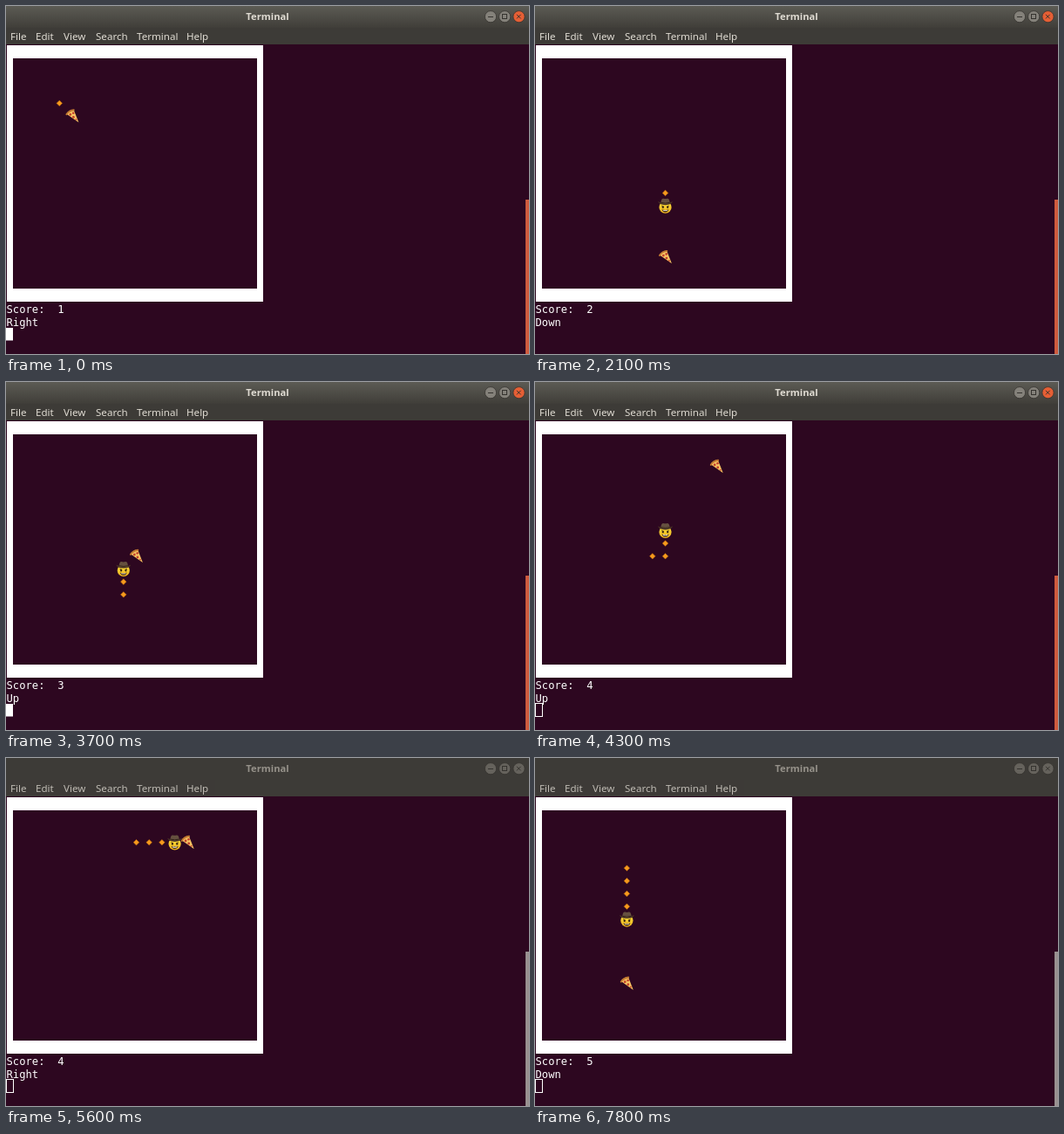
Write an HTML page that moves like this. It is 600 px wide and 399 px high and loops after 8 s.

```html
<!DOCTYPE html>
<html lang="en">
<head>
<meta charset="utf-8">
<title>Terminal</title>
<style>
  html, body { margin: 0; width: 100%; height: 100%; overflow: hidden; background: #2d0720; }
  svg { display: block; width: 600px; height: 399px; }
  .ui { font-family: "Noto Sans", "Open Sans", sans-serif; font-size: 11.6px; fill: #dfdbd2; }
  .title { font-size: 11.2px; font-weight: 700; text-anchor: middle; }
  .mono { font-family: "DejaVu Sans Mono", monospace; font-size: 12.2px; fill: #fff; white-space: pre; }
</style>
</head>
<body>
<svg viewBox="0 0 600 399">
  <defs>
    <linearGradient id="bar" x1="0" y1="0" x2="0" y2="1">
      <stop offset="0" stop-color="#5c5b54"/>
      <stop offset="1" stop-color="#403e39"/>
    </linearGradient>
    <linearGradient id="skin" x1="0" y1="0" x2="0" y2="1">
      <stop offset="0" stop-color="#fbe13c"/>
      <stop offset="1" stop-color="#eeb320"/>
    </linearGradient>
    <path id="dot" d="M0-3.3 3.3 0 0 3.3-3.3 0z" fill="#f59a1d" stroke="#b9640f" stroke-width=".5"/>
    <g id="pizza">
      <path d="M-6.6-2.4Q-4-7 1.6-7.4L7.4 7.4z" fill="#f6c463"/>
      <path d="M-6.6-1.9Q-4-6.4 1.8-7" fill="none" stroke="#c27a32" stroke-width="1.9" stroke-linecap="round"/>
      <g fill="#c2402c">
        <circle cx="-2.2" cy="-1.8" r="1.4"/>
        <circle cx="1.2" cy="-3.5" r="1.3"/>
        <circle cx="1.4" cy="1.2" r="1.4"/>
        <circle cx="4.4" cy="4" r=".9"/>
      </g>
    </g>
    <g id="face">
      <circle cy="1.6" r="7.1" fill="url(#skin)"/>
      <path d="M-8.4-5Q-5-2.6 0-2.6T8.4-5Q7.5-.9 0-.9T-8.4-5z" fill="#4a3426"/>
      <path d="M-5.2-3.2Q-4.8-8.6-2.2-8.4Q0-7.6 2.2-8.4Q4.8-8.6 5.2-3.2Q0-1.6-5.2-3.2z" fill="#65503f"/>
      <path d="M-5.1-3.7Q0-2.3 5.1-3.7" fill="none" stroke="#33231a"/>
      <path d="M-4.2 0-1.6 1.1M4.2 0 1.6 1.1" stroke="#493012" stroke-width=".9"/>
      <ellipse cx="-2.7" cy="1.7" rx="1.1" ry="1.3" fill="#3b2912"/>
      <ellipse cx="2.7" cy="1.7" rx="1.1" ry="1.3" fill="#3b2912"/>
      <path d="M-4 4.2Q0 5.4 4 4.2Q2.8 7.4 0 7.4T-4 4.2z" fill="#493012"/>
      <path d="M-2.8 4.8Q0 5.5 2.8 4.8L2.4 5.6Q0 6.1-2.4 5.6z" fill="#fff"/>
    </g>
    <g id="signs" fill="none" stroke="#35332f">
      <path d="M553 12.5h6"/>
      <rect x="569.5" y="9.5" width="5" height="5"/>
      <path d="M586 9.8l4.6 4.6m0-4.6l-4.6 4.6"/>
    </g>
  </defs>

  <rect width="600" height="399" fill="#2d0720"/>
  <rect width="600" height="44" fill="#3d3b37"/>
  <rect width="600" height="25" fill="url(#bar)"/>
  <g stroke="#35332f" stroke-width=".8">
    <circle cx="556" cy="12.2" r="6.6" fill="#84817a"/>
    <circle cx="572.2" cy="12.2" r="6.6" fill="#84817a"/>
    <circle cx="588.5" cy="12.2" r="6.6" fill="#e65f35"/>
  </g>
  <use href="#signs"/>
  <text class="ui title" x="300" y="16.3">Terminal</text>
  <g class="ui" id="menu"></g>
  <rect x="596" y="222" width="4" height="177" fill="#cf5b3e"/>

  <g id="dim" opacity="0">
    <rect width="600" height="25" fill="#3d3b37"/>
    <g fill="#65625c" stroke="#35332f" stroke-width=".8">
      <circle cx="556" cy="12.2" r="6.6"/>
      <circle cx="572.2" cy="12.2" r="6.6"/>
      <circle cx="588.5" cy="12.2" r="6.6"/>
    </g>
    <use href="#signs"/>
    <text class="ui title" x="300" y="16.3" style="fill:#96928a">Terminal</text>
    <rect y="25" width="240" height="19" fill="#3d3b37" opacity=".2"/>
    <rect x="596" y="222" width="4" height="177" fill="#989090"/>
  </g>

  <path d="M1 45H295V339H1zM8 60V324H288V60z" fill="#fff" fill-rule="evenodd"/>
  <g id="board"></g>
  <text class="mono" id="score" x="0.5" y="352"></text>
  <text class="mono" id="label" x="0.5" y="366.7"></text>
  <rect id="block" y="369" width="8" height="14.5" fill="#fff"/>
  <rect id="hollow" x=".5" y="368.5" width="8" height="15" fill="none" stroke="#fff"/>
</svg>
<script>
const LOOP = 8000, FRAME = 100, STEP = 156, LEAD = 95, BLUR = 4300;
const NS = 'http://www.w3.org/2000/svg';
const $ = id => document.getElementById(id);

function add(parent, tag, attrs) {
  const el = document.createElementNS(NS, tag);
  for (const k in attrs) el.setAttribute(k, attrs[k]);
  return parent.appendChild(el);
}

const menu = { File: 5, Edit: 34, View: 66, Search: 103, Terminal: 150, Help: 207 };
for (const name in menu) add($('menu'), 'text', { x: menu[name], y: 39 }).textContent = name;

// The walk over the grid, as runs of direction and length
const dirs = { R: ['Right', 1, 0], L: ['Left', -1, 0], U: ['Up', 0, -1], D: ['Down', 0, 1] };
const path = [{ x: 3, y: 3, label: 'Right' }];
for (const run of 'R1 D1 R5 D11 L1 U6 R1 U7 R4 D1 L7 D5'.split(' ')) {
  const [label, dx, dy] = dirs[run[0]];
  for (let n = +run.slice(1); n--;) {
    const p = path[path.length - 1];
    path.push({ x: p.x + dx, y: p.y + dy, label });
  }
}
path[7].label = 'Down'; // this key comes in before the move

const meals = [[4, 4], [9, 15], [9, 9], [13, 2], [6, 13]].map(([x, y]) => ({ x, y }));
const eaten = [];
path.forEach((p, k) => {
  const m = meals[eaten.length];
  if (m && p.x === m.x && p.y === m.y) eaten.push(k);
});

const pizza = add($('board'), 'use', { href: '#pizza' });
const snake = meals.map(() => add($('board'), 'use', {}));

function place(el, p) {
  el.setAttribute('transform', `translate(${17.2 + 14.7 * p.x} ${67.4 + 14.7 * p.y})`);
}
const show = (el, on) => el.setAttribute('visibility', on ? 'visible' : 'hidden');

function draw(time) {
  const t = Math.floor(time / FRAME) * FRAME;
  const k = Math.min(Math.floor((t + LEAD) / STEP), path.length - 1);
  const count = eaten.filter(e => e <= k).length;
  const size = count + 1;

  place(pizza, meals[count]);
  snake.forEach((el, i) => {
    const on = i < size && i <= k;
    show(el, on);
    if (!on) return;
    el.setAttribute('href', i === 0 && size > 1 ? '#face' : '#dot');
    place(el, path[k - i]);
  });

  $('score').textContent = 'Score:  ' + size;
  $('label').textContent = path[k].label;
  $('dim').setAttribute('opacity', Math.max(0, Math.min(1, (t - BLUR) / 160)));
  show($('block'), t < BLUR && t % 1200 < 600);
  show($('hollow'), t >= BLUR);
}

const start = performance.now();
function tick() {
  draw((performance.now() - start) % LOOP);
  requestAnimationFrame(tick);
}
tick();
</script>
</body>
</html>
```
